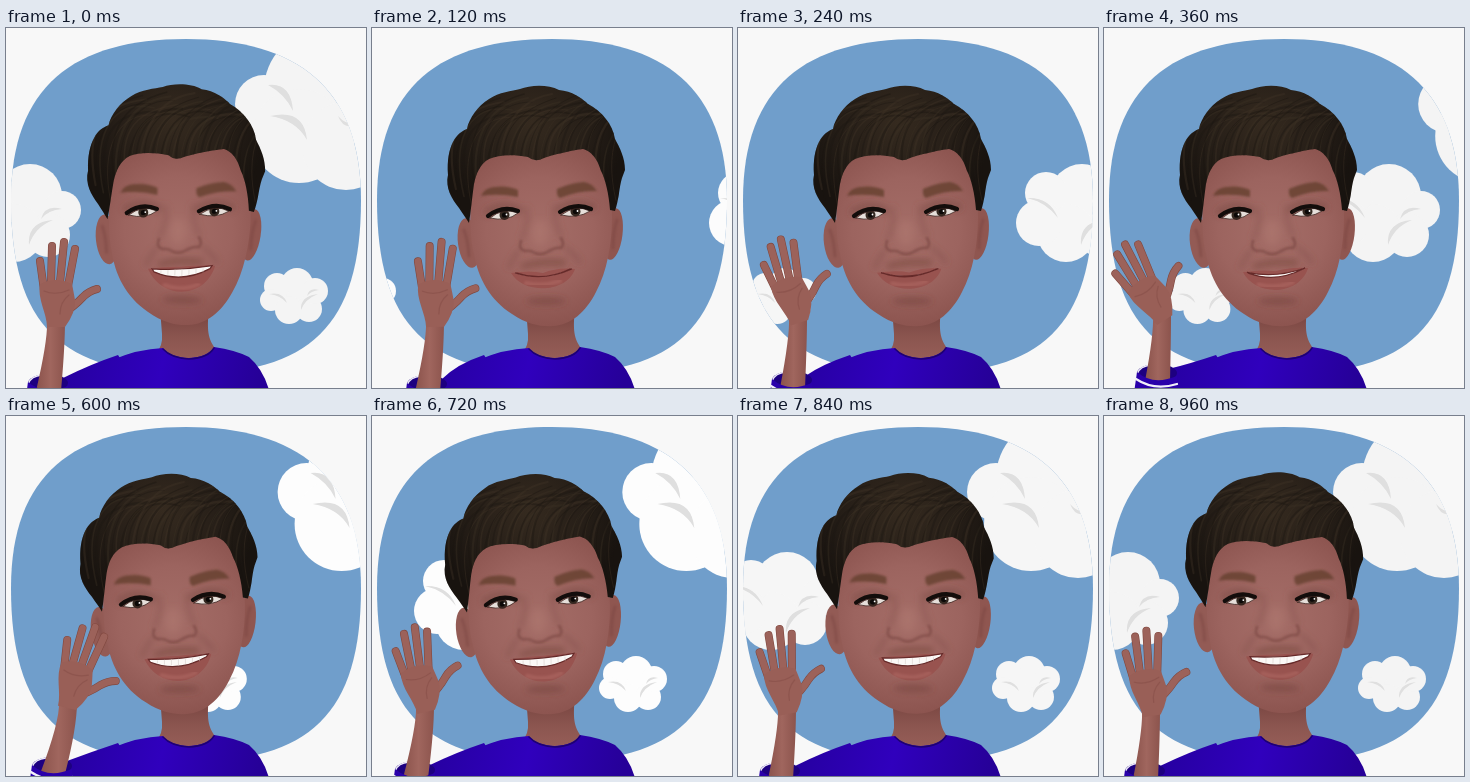
Recreate the animation shown at these times as an HTML page. Size 360 by 360 pixels, loop 1.08 s.

```html
<!DOCTYPE html>
<html lang="en">
<head>
<meta charset="utf-8">
<title>Waving avatar</title>
<style>
html, body { margin: 0; width: 100%; height: 100%; overflow: hidden; background: #f8f8f8; }
svg { display: block; width: 100vw; height: 100vh; }
.line { fill: none; stroke-linecap: round; stroke-linejoin: round; }
</style>
</head>
<body>
<svg viewBox="0 0 360 360">
  <defs>
    <path id="blob" d="M180 11C291 11 355 60 355 172C355 298 304 346 180 346C56 346 5 298 5 172C5 58 68 11 180 11Z"/>
    <clipPath id="sky"><use href="#blob"/></clipPath>
    <path id="hair" d="M97 195C94 190 91 186 87 180C80 171 73 160 76 147C75 132 77 122 81 114C85 106 90 103 95 101C97 90 106 78 117 71C127 64 140 63 148 61C158 57 176 56 187 62C200 63 210 70 216 76C230 83 241 97 243 111C248 120 253 130 253 142L250 150C247 160 247 172 243 183L238 182C237 166 233 150 229 143C225 130 219 123 211 121C196 123 181 127 172 130Q163 135 156 129C140 126 126 127 117 131C108 136 104 146 102 156C100 170 99 182 97 195Z"/>
    <clipPath id="hairClip"><use href="#hair"/></clipPath>
    <radialGradient id="hairTone" gradientUnits="userSpaceOnUse" cx="160" cy="95" r="95">
      <stop offset="0" stop-color="#352a1f"/><stop offset=".55" stop-color="#271f18"/><stop offset="1" stop-color="#18130f"/>
    </radialGradient>
    <radialGradient id="skin" gradientUnits="userSpaceOnUse" cx="168" cy="204" r="98">
      <stop offset="0" stop-color="#a46d67"/><stop offset=".55" stop-color="#9c645f"/><stop offset="1" stop-color="#8b534e"/>
    </radialGradient>
    <linearGradient id="neck" x1="0" y1="0" x2="0" y2="1">
      <stop offset="0" stop-color="#75423e"/><stop offset=".55" stop-color="#8c5650"/><stop offset="1" stop-color="#985f59"/>
    </linearGradient>
    <linearGradient id="arm"><stop offset="0" stop-color="#8a524b"/><stop offset=".5" stop-color="#a0665e"/><stop offset="1" stop-color="#8c544d"/></linearGradient>
    <linearGradient id="cloth" gradientUnits="userSpaceOnUse" x1="60" y1="320" x2="250" y2="365">
      <stop offset="0" stop-color="#2600a0"/><stop offset=".5" stop-color="#3000bd"/><stop offset="1" stop-color="#260098"/>
    </linearGradient>
    <filter id="soft"><feGaussianBlur stdDeviation="3"/></filter>
    <filter id="faint"><feGaussianBlur stdDeviation="1"/></filter>
  </defs>

  <use href="#blob" fill="#709ecb"/>
  <g clip-path="url(#sky)"><g id="clouds"></g></g>

  <path d="M154 280H203C201 300 201 312 211 322L184 336L150 325Q157 318 156 306Z" fill="url(#neck)"/>
  <path id="sleeve" fill="url(#cloth)"/>
  <path d="M100 362L106 332Q132 321 157 320Q164 329 183 330Q202 329 208 319Q229 322 243 329Q257 341 263 362Z" fill="url(#cloth)"/>
  <path class="line" d="M157 321Q165 330 183 331Q202 330 208 320" stroke="#1d0074" stroke-width="1.5"/>

  <g id="head">
    <ellipse cx="97" cy="215" rx="11" ry="25" transform="rotate(-8 97 215)" fill="#935b55"/>
    <ellipse cx="241" cy="206" rx="9.5" ry="26" transform="rotate(7 241 206)" fill="#8f5650"/>
    <path class="line" d="M92 202Q96 212 97 228M245 192Q241 204 241 220" stroke="#74413d" stroke-width="3" opacity=".4" filter="url(#faint)"/>
    <path d="M102 140C97 170 97 205 102 226C106 250 118 272 140 286C156 297 171 299 181 298C199 297 214 284 224 264C235 244 240 215 240 190C240 165 235 145 225 122L165 110L115 122Z" fill="url(#skin)"/>
    <g filter="url(#soft)">
      <ellipse cx="168" cy="205" rx="8" ry="13" fill="#b27b74" opacity=".4"/>
      <path class="line" d="M147 222Q141 230 137 239M193 219Q202 226 208 234" stroke="#7d4a45" stroke-width="4" opacity=".45"/>
      <path class="line" d="M155 181Q157 196 150 210M182 179Q182 194 189 208" stroke="#834e49" stroke-width="5" opacity=".4"/>
      <path class="line" d="M116 184Q130 174 147 182M188 181Q204 171 220 179" stroke="#6d3f3a" stroke-width="8" opacity=".4"/>
      <path d="M148 236Q169 228 195 232L192 238Q170 236 150 241Z" fill="#704039" opacity=".5"/>
      <ellipse cx="174" cy="273" rx="20" ry="4" fill="#6e3d38" opacity=".45"/>
    </g>
    <path class="line" d="M149 213Q146 221 153 223Q158 222 163 225Q170 228 177 223Q184 219 189 220Q193 216 189 210" stroke="#75423d" stroke-width="2.6" opacity=".6" filter="url(#faint)"/>
    <path d="M109 168Q112 160 122 159Q136 157 146 162L146 169Q126 165 109 168ZM185 161Q198 155 212 154Q220 155 225 163Q208 162 188 170Q184 168 185 161Z" fill="#65402f" opacity=".8" filter="url(#faint)"/>
    <g id="eyes"></g>
    <path id="lips" fill="#98534f"/>
    <path id="lowLip" class="line" stroke="#b06a65" stroke-width="4" opacity=".55" filter="url(#faint)"/>
    <path id="teeth" fill="#fbf8f6" stroke="#662a29" stroke-width="1.2"/>
    <path id="gaps" class="line" stroke="#d8cfcb" stroke-width=".6"/>
    <use href="#hair" fill="url(#hairTone)"/>
    <g id="strands" class="line" clip-path="url(#hairClip)"></g>
  </g>

  <g id="cuffBack">
    <ellipse rx="20" ry="9" fill="#1d0080"/>
    <path class="line" d="M-20 1Q-17 -7 -6 -8" stroke="#ece9f7" stroke-width="1.5"/>
  </g>
  <path id="forearm" fill="url(#arm)"/>
  <g id="cuffFront">
    <path d="M-20 -1Q-4 13 20 3V34H-25Z" fill="#2a00aa"/>
    <path class="line" d="M-21 6Q-3 18 20 11" stroke="#f2effa" stroke-width="2.2"/>
  </g>
  <g id="hand"></g>
</svg>
<script>
const $ = id => document.getElementById(id);
const set = (id, name, value) => $(id).setAttribute(name, value);
const STEP = 120, COUNT = 9;

// Each cloud: round lobes [x, y, radius] and crescent shading.
const clouds = {
  big: {
    lobes: [[258, 76, 29], [318, 62, 60], [293, 108, 47], [340, 118, 44]],
    shade: "M262 57Q285 54 287 83Q279 66 262 57ZM264 88Q298 80 301 112Q290 92 264 88ZM332 88Q340 97 350 96Q338 103 332 88Z"
  },
  mid: {
    lobes: [[8, -17, 32], [40, -3, 19], [26, 22, 22], [-8, 20, 29], [-28, -20, 21], [-35, 10, 23]],
    shade: "M7 32Q5 9 31 7Q13 14 7 32ZM19 6Q23 -9 40 -4Q26 -3 19 6ZM-47 -15Q-24 -16 -16 5Q-28 -11 -47 -15Z"
  },
  small: {
    lobes: [[0, 0, 21], [3, -12, 16], [-17, -10, 13], [-23, 4, 11], [-5, 14, 14], [15, 13, 13], [21, -5, 13]],
    shade: "M7 14Q6 0 24 -2Q11 3 7 14ZM13 0Q15 -9 25 -6Q17 -5 13 0ZM-25 -2Q-11 -5 -7 7Q-14 -1 -25 -2Z"
  }
};
$("clouds").innerHTML = Object.entries(clouds).map(([id, c]) =>
  `<g id="${id}">` + c.lobes.map(([x, y, r]) => `<circle cx="${x}" cy="${y}" r="${r}"/>`).join("") +
  `<path d="${c.shade}" fill="#dfdfdf"/></g>`).join("");

// Hair swept up and to the right.
let strands = "";
for (let i = 0; i < 44; i++) {
  const x = 76 + i * 4, y = 142 + 9 * Math.sin(i * 2.4);
  strands += `<path d="M${x} ${y + 28}C${x - 12} ${y - 22} ${x} ${86 - i % 5 * 3} ${x + 48} ${66 + i % 7 * 4}" ` +
    `stroke="${["#3b3025", "#1d1712", "#403427", "#1a1510"][i % 4]}" stroke-width="${1 + i % 3 * .6}" opacity=".4"/>`;
}
$("strands").innerHTML = strands;

const eye = (white, lash, x, y) =>
  `<path d="${white}" fill="#e6dfda"/><circle cx="${x}" cy="${y}" r="5" fill="#332820"/>` +
  `<circle cx="${x}" cy="${y}" r="2.6" fill="#0b0807"/><circle cx="${x + 2}" cy="${y - .5}" r=".9" fill="#fff"/>` +
  `<path class="line" d="${white}" stroke="#3d2420" stroke-width=".8"/>` +
  `<path class="line" d="${lash}" stroke="#130d0b" stroke-width="4.2"/>`;
$("eyes").innerHTML =
  eye("M118 190Q131 179 146 185Q135 194 118 190Z", "M116 188Q130 177 146 183", 132.5, 187) +
  eye("M189 187Q204 176 218 183Q206 191 189 187Z", "M188 184Q204 174 219 181", 203.5, 183.5);

const fingers = "M-12 -32L-16 -61M-5 -38L-4 -76M4 -40L8 -80M12 -36L19 -73M4 -7Q18 -15 27 -25Q33 -31 41 -33";
const stroke = (color, w) => `<path class="line" d="${fingers}" stroke="${color}" stroke-width="${w}"/>`;
$("hand").innerHTML = stroke("#80483f", 8) + stroke("#9c625a", 6.8) +
  `<path d="M-9 5C-9 -9 -19 -23 -16 -38Q0 -46 16 -38Q18 -28 19 -22Q20 -10 9 5Z" fill="#995f57"/>` +
  `<path class="line" d="M-12 -31Q0 -26 13 -32M4 -8Q4 -20 13 -27" stroke="#834c45" stroke-width="1.2" opacity=".5"/>`;

// tilt, mouth opening, wrist x, wrist y, hand angle, elbow x, cuff y
const poses = [
  [1.8, 1, 50, 294, 0, 42, 355],
  [0, 0, 63, 294, -1, 55, 356],
  [0, .1, 60, 290, -18, 54, 352],
  [0, .35, 58, 288, -33, 53, 345],
  [0, .85, 71, 284, 36, 48, 342],
  [-.5, 1, 62, 287, 14, 46, 350],
  [-1, 1.1, 53, 291, -13, 43, 354],
  [.8, 1.05, 49, 293, -11, 42, 355],
  [1.8, 1.05, 47, 295, -9, 41, 355]
];
const tones = ["f4", "fc", "f6", "f4", "fd", "fd", "fd", "f6", "f4"];

function drawClouds(k) {
  const n = k || COUNT - 1;
  const move = (id, x, y) => set(id, "transform", `translate(${x} ${y})`);
  move("big", Math.max(0, 21.3 * (7 - n)), 0);
  move("mid", Math.max(16, 100 + 59 * (6 - n)), 185);
  move("small", Math.min(288, 261 + 54.2 * (n - 6)), 268);
  set("clouds", "fill", "#" + tones[k].repeat(3));
}

function drawMouth(o) {
  const lx = 139, ly = 245 - 2 * o, rx = 203 + 3 * o, ry = 241 - 3 * o, cx = 171 + 2 * o;
  const top = 254 - 10 * o, low = 254 + 3 * o, side = 3 * o;
  set("lips", "d", `M${lx} ${ly}Q158 ${242 - 2 * o} ${cx} ${245 - 5 * o}Q186 ${239 - o} ${rx} ${ry}` +
    `C${195 + 2 * o} ${265 + 7 * o} ${152 + o} ${267 + 7 * o} ${lx} ${ly}Z`);
  set("lowLip", "d", `M${cx - 17} ${255 + 4 * o}Q${cx} ${259 + 6 * o} ${cx + 17} ${253 + 4 * o}`);
  set("teeth", "d", `M${lx + 4} ${ly}Q${cx} ${top} ${rx - 3} ${ry}l-2 ${side}` +
    `Q${cx} ${low} ${lx + 6} ${ly + side}Z`);
  let gaps = "";
  for (let i = -3; i <= 3; i++) gaps += `M${cx + i * 7} ${243 - i * .5}v${6 - Math.abs(i)}`;
  set("gaps", "d", o > .5 ? gaps : "");
}

function drawArm(wx, wy, angle, ex, cy) {
  const at = `translate(${ex} ${cy})`;
  set("cuffBack", "transform", at);
  set("cuffFront", "transform", at);
  set("sleeve", "d", `M${ex + 15} ${cy - 5}Q85 336 112 327L135 362H${ex}Z`);
  set("forearm", "d", `M${wx - 9} ${wy - 1}Q${wx - 8} ${wy + 18} ${ex - 12} ${cy + 8}` +
    `H${ex + 13}Q${wx + 9} ${wy + 24} ${wx + 9} ${wy - 1}Z`);
  set("hand", "transform", `translate(${wx} ${wy}) rotate(${angle})`);
}

function draw(time) {
  const k = Math.floor(time / STEP) % COUNT;
  const [tilt, open, ...arm] = poses[k];
  const lift = Math.max(0, tilt);
  drawClouds(k);
  set("head", "transform", `translate(${lift * .5} ${-lift * .6}) rotate(${tilt} 180 310)`);
  drawMouth(open);
  drawArm(...arm);
}

const start = performance.now();
function loop() {
  draw(performance.now() - start);
  requestAnimationFrame(loop);
}
loop();
</script>
</body>
</html>
```
